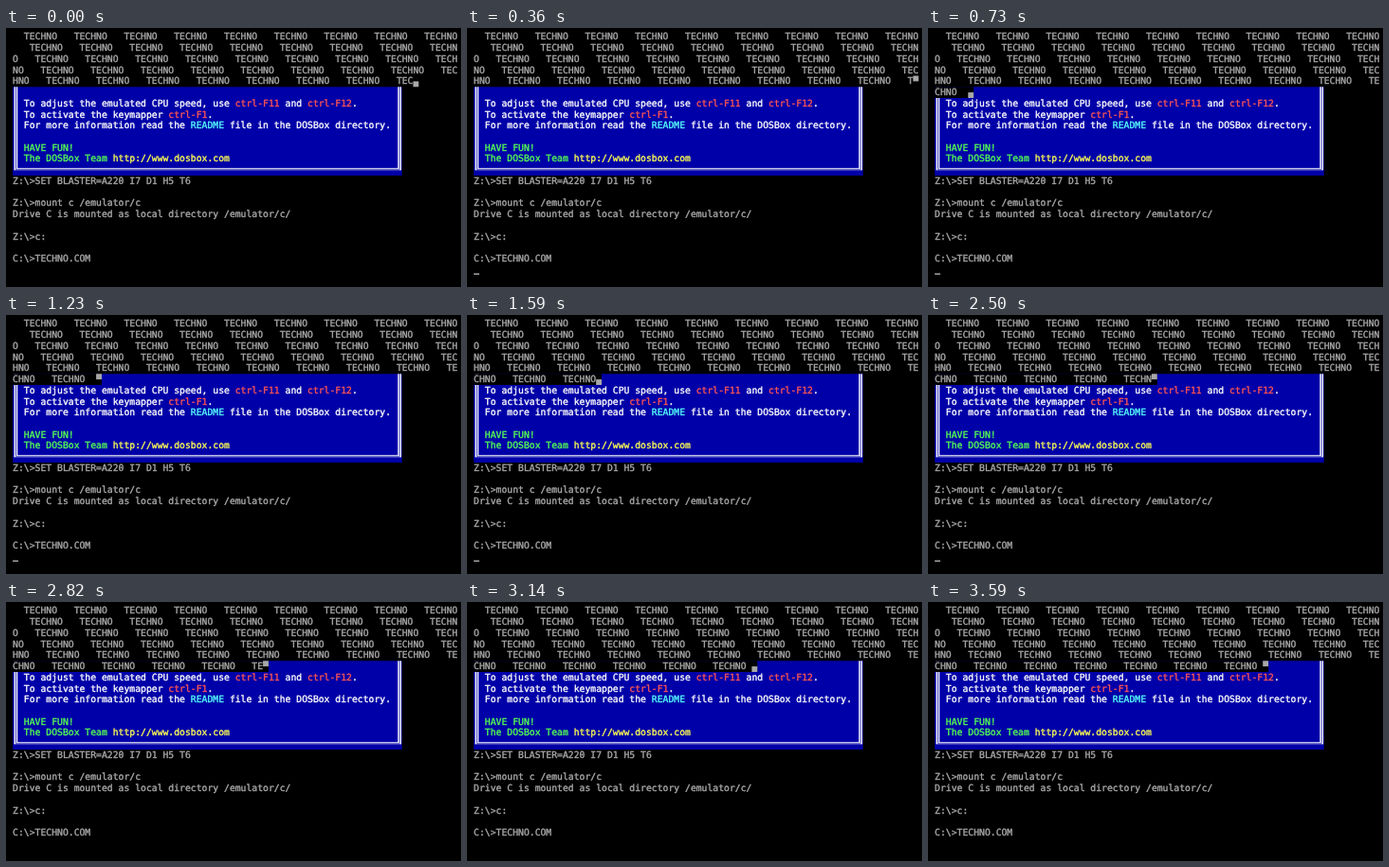
Animation of 480 by 274 pixels, one loop 3.63 s. Source, as an HTML page with a canvas:

```html
<!DOCTYPE html>
<html lang="en">
<head>
<meta charset="utf-8">
<title>TECHNO.COM</title>
<style>
  html, body { margin: 0; width: 100%; height: 100%; overflow: hidden; background: #000; }
  canvas { display: block; width: 480px; height: 274px; }
</style>
</head>
<body>
<canvas width="480" height="274"></canvas>
<script>
const ctx = document.querySelector('canvas').getContext('2d');
const LOOP = 3630, COLS = 80, CW = 8, CH = 16, SCALE = 0.7333;
const GRAY = '#a8a8a8', BLUE = '#0000a8', WHITE = '#fcfcfc',
      RED = '#fc5454', CYAN = '#54fcfc', GREEN = '#54fc54', YELLOW = '#fcfc54';

// [row, column, colour, text, colour, text, ...]
const LINES = [
  [6, 2, WHITE, 'To adjust the emulated CPU speed, use ', RED, 'ctrl-F11', WHITE, ' and ', RED, 'ctrl-F12', WHITE, '.'],
  [7, 2, WHITE, 'To activate the keymapper ', RED, 'ctrl-F1', WHITE, '.'],
  [8, 2, WHITE, 'For more information read the ', CYAN, 'README', WHITE, ' file in the DOSBox directory.'],
  [10, 2, GREEN, 'HAVE FUN!'],
  [11, 2, GREEN, 'The DOSBox Team ', YELLOW, 'http://www.dosbox.com'],
  [13, 0, GRAY, 'Z:\\>SET BLASTER=A220 I7 D1 H5 T6'],
  [15, 0, GRAY, 'Z:\\>mount c /emulator/c'],
  [16, 0, GRAY, 'Drive C is mounted as local directory /emulator/c/'],
  [18, 0, GRAY, 'Z:\\>c:'],
  [20, 0, GRAY, 'C:\\>TECHNO.COM'],
];

// Uneven typing pace: [tick, screen cell of the block]
const PACE = [[0, 392], [16, 406], [27, 415], [44, 430], [55, 439], [69, 450], [79, 459]];

function rect(x, y, w, h, color) {
  ctx.fillStyle = color;
  ctx.fillRect(x, y, w, h);
}

function print(row, col, text, color) {
  ctx.fillStyle = ctx.strokeStyle = color;
  for (const ch of text) {
    const x = (col++ + 0.5) * CW, y = row * CH + 12;
    ctx.fillText(ch, x, y);
    ctx.strokeText(ch, x, y);
  }
}

function drawPanel() {
  const top = 5 * CH, bottom = 12 * CH, right = 69 * CW;
  rect(0, top, 70 * CW, 8 * CH, BLUE);
  for (const [x, end] of [[2, 8], [5, 6], [right + 2, 6], [right + 5, 8]])
    rect(x, top, 2, bottom + end - top, WHITE);
  rect(5, bottom + 5, right - 1, 1, WHITE);
  rect(2, bottom + 7, right + 5, 1, WHITE);
}

function blockCell(tick) {
  const i = PACE.findIndex(p => p[0] >= tick) || 1;
  const [t0, c0] = PACE[i - 1], [t1, c1] = PACE[i];
  return Math.round(c0 + (c1 - c0) * (tick - t0) / (t1 - t0));
}

function drawTyping(cell) {
  for (let i = 0; i <= cell; i++) {
    const row = Math.floor(i / COLS), col = i % COLS;
    if (row === 5 && col === 0) rect(0, row * CH, (cell - i + 1) * CW, CH, '#000');
    if (i < cell) print(row, col, 'TECHNO   '[(i + 7) % 9], GRAY);
    else rect(col * CW, row * CH + (cell % 2 ? 0 : 8), CW, 8, GRAY);
  }
}

function draw(ms) {
  const tick = Math.floor((Math.floor(ms / 10) * 10 + 5) * 0.022); // 22 per second
  ctx.setTransform(1, 0, 0, 1, 0, 0);
  rect(0, 0, 480, 274, '#000');
  ctx.setTransform(SCALE, 0, 0, SCALE, 7.1, 3.6);
  ctx.font = '13.29px "DejaVu Sans Mono", monospace';
  ctx.textAlign = 'center';
  ctx.textRendering = 'geometricPrecision';
  ctx.lineWidth = 0.5;
  ctx.lineJoin = 'round';

  drawPanel();
  for (const [row, start, ...runs] of LINES)
    for (let i = 0, col = start; i < runs.length; col += runs[i + 1].length, i += 2)
      print(row, col, runs[i + 1], runs[i]);
  drawTyping(blockCell(tick));
  if ((tick / 9.9 + 0.54) % 1 < 0.5) rect(0, 21 * CH + 13, CW, 2, GRAY);
}

function loop() {
  draw(performance.now() % LOOP);
  requestAnimationFrame(loop);
}
loop();
</script>
</body>
</html>
```
